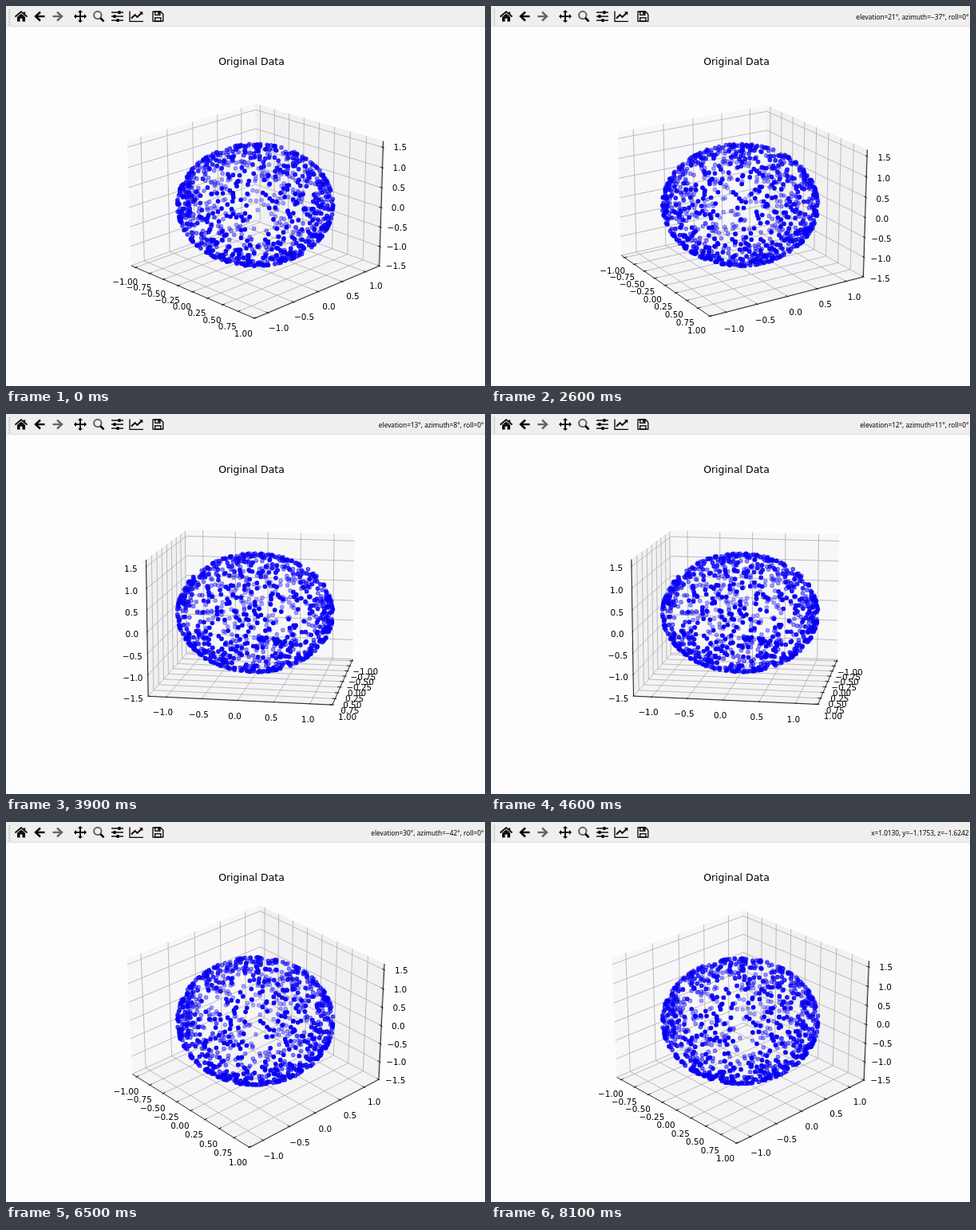
An HTML page with a canvas that plays this animation: 600x477 px, repeating every 8900 ms.

```html
<!DOCTYPE html>
<html lang="en">
<head>
<meta charset="utf-8">
<title>3D scatter</title>
<style>
  html, body { margin: 0; width: 100%; height: 100%; overflow: hidden; background: #fdfcff; }
  canvas { display: block; width: 600px; height: 477px; }
</style>
</head>
<body>
<canvas id="stage" width="600" height="477"></canvas>
<script>
const ctx = document.getElementById('stage').getContext('2d');
const LOOP = 8900, STEP = 100, RAD = Math.PI / 180;
const PLOT_FONT = '"DejaVu Sans", sans-serif';
const UI_FONT = '"Noto Sans", sans-serif';

// key points of the drag: time, elevation, azimuth
const KEYS = [
  [1700, 20.7, -44.8], [2500, 21, -37], [2600, 20.3, -32], [3300, 18, -2],
  [3400, 16.5, 0.3], [4500, 12, 11], [4600, 12.1, 9.5], [5200, 11, -31],
  [5500, 13, -26], [5600, 14.3, -27], [6400, 30, -42.3], [6500, 30.1, -42.6],
  [7100, 26.8, -43.6]
];

function slope(i, c) {
  if (i === 0 || i === KEYS.length - 1) return 0;
  const [a, b, d] = [KEYS[i - 1], KEYS[i], KEYS[i + 1]];
  const h0 = b[0] - a[0], h1 = d[0] - b[0];
  return ((b[c] - a[c]) / h0 * h1 + (d[c] - b[c]) / h1 * h0) / (h0 + h1);
}

// smooth cubic through the key points
function track(t, c) {
  const last = KEYS.length - 1;
  if (t <= KEYS[0][0]) return KEYS[0][c];
  if (t >= KEYS[last][0]) return KEYS[last][c];
  const i = KEYS.findIndex(k => k[0] > t) - 1;
  const a = KEYS[i], b = KEYS[i + 1], h = b[0] - a[0], s = (t - a[0]) / h;
  const ease = s * s * (3 - 2 * s);
  return a[c] + (b[c] - a[c]) * ease
    + h * s * (1 - s) * ((1 - s) * slope(i, c) - s * slope(i + 1, c));
}

// half sizes of the box in view units
const W = 0.595, H = 0.75 * W;
// the data keeps a margin of 10% plus 1/24 inside the box
const FIT = 1 / (1.1 * 25 / 24);

// points spread evenly over an ellipsoid
let seed = 20731;
function random() {
  seed = (seed * 1664525 + 1013904223) >>> 0;
  return seed / 4294967296;
}
const points = Array.from({ length: 1000 }, () => {
  const z = 2 * random() - 1, a = 2 * Math.PI * random(), r = Math.sqrt(1 - z * z);
  return [W * FIT * r * Math.cos(a), W * FIT * r * Math.sin(a), H * FIT * z];
});

const minus = v => String(v).replace('-', '\u2212');
const ticks = (n, step, scale, shift, digits) =>
  Array.from({ length: 2 * n + 1 }, (_, i) => {
    const v = (i - n) * step;
    return { at: shift + scale * v, text: minus(v.toFixed(digits)) };
  });
const XT = ticks(4, 0.25, 0.569, 0.02, 2);
const YT = ticks(2, 0.5, 0.465, -0.012, 1);
const ZT = ticks(3, 0.5, 0.2825, -0.022, 1);

// perspective from a distance of 10
function camera(elev, azim) {
  const se = Math.sin(elev * RAD), ce = Math.cos(elev * RAD);
  const sa = Math.sin(azim * RAD), ca = Math.cos(azim * RAD);
  return ([x, y, z]) => {
    const ahead = ca * x + sa * y, near = ce * ahead + se * z;
    const k = 1877 / (10 - near);
    return [312.2 + k * (ca * y - sa * x), 249 - k * (ce * z - se * ahead), near];
  };
}

function trace(pts) {
  ctx.beginPath();
  pts.forEach(p => ctx.lineTo(p[0], p[1]));
}
function line(pts, width, color = '#000') {
  trace(pts);
  ctx.strokeStyle = color;
  ctx.lineWidth = width;
  ctx.stroke();
}
function fill(pts, color = '#000') {
  trace(pts);
  ctx.fillStyle = color;
  ctx.fill();
}
function box(x, y, w, h, color = '#000') {
  ctx.fillStyle = color;
  ctx.fillRect(x, y, w, h);
}
function label(text, x, y, size, font = PLOT_FONT, align = 'center') {
  ctx.font = size + 'px ' + font;
  ctx.textAlign = align;
  ctx.fillStyle = '#000';
  ctx.fillText(text, x, y + 0.365 * size);
}

function drawPlot(elev, azim) {
  const cam = camera(elev, azim);
  const s = azim < 0 ? -1 : 1;      // side of y facing the viewer
  const n = s * W, f = -n;
  const poly = pts => pts.map(cam);

  fill(poly([[-W, -W, -H], [-W, W, -H], [-W, W, H], [-W, -W, H]]), 'rgba(242,242,242,.5)');
  fill(poly([[-W, f, -H], [W, f, -H], [W, f, H], [-W, f, H]]), 'rgba(230,230,230,.5)');
  fill(poly([[-W, -W, -H], [W, -W, -H], [W, W, -H], [-W, W, -H]]), 'rgba(236,236,236,.5)');

  const grid = pts => line(poly(pts), 0.83, '#b0b0b0');
  XT.forEach(({ at }) => grid([[at, n, -H], [at, f, -H], [at, f, H]]));
  YT.forEach(({ at }) => grid([[W, at, -H], [-W, at, -H], [-W, at, H]]));
  ZT.forEach(({ at }) => grid([[W, f, at], [-W, f, at], [-W, n, at]]));

  const axis = pts => line(poly(pts), 0.83);
  axis([[-W, n, -H], [W, n, -H]]);
  axis([[W, -W, -H], [W, W, -H]]);
  axis([[W, f, -H], [W, f, H]]);

  const out = W + 0.0095, inn = W - 0.019;
  const side = W + 0.095, below = -H - 0.075, beside = W + 0.079;
  const tag = (text, p) => {
    const [x, y] = cam(p);
    label(text, x, y, 10.4);
  };
  XT.forEach(({ at, text }) => {
    axis([[at, s * inn, -H], [at, s * out, -H]]);
    tag(text, [at, s * side, below]);
  });
  YT.forEach(({ at, text }) => {
    axis([[inn, at, -H], [out, at, -H]]);
    tag(text, [side, at, below]);
  });
  ZT.forEach(({ at, text }) => {
    axis([[inn, f, at], [out, f, at]]);
    tag(text, [beside, -s * beside, at]);
  });

  // far dots are paler
  const dots = points.map(cam).sort((a, b) => a[2] - b[2]);
  const far = dots[0][2], span = dots[dots.length - 1][2] - far;
  ctx.lineWidth = 1.04;
  for (const [x, y, d] of dots) {
    ctx.beginPath();
    ctx.arc(x, y, 2.33, 0, 2 * Math.PI);
    ctx.fillStyle = ctx.strokeStyle = `rgba(8,0,245,${0.3 + 0.7 * (d - far) / span})`;
    ctx.fill();
    ctx.stroke();
  }
  label('Original Data', 307.5, 69, 12.5);
}

function arrow(x, dir, color) {
  const tip = x - 5 * dir;
  line([[x + 6.5 * dir, 13], [tip, 13]], 2.4, color);
  line([[x + dir, 7.5], [tip, 13], [x + dir, 18.5]], 2.4, color);
}

function drawToolbar() {
  box(0, 0, 600, 25, '#f0eff0');
  box(0, 25, 600, 1, '#dcdbdd');
  for (let y = 4; y < 23; y += 3) box(3.5, y, 1.5, 1.5, '#b4b4b4');

  // home
  line([[11.5, 13.5], [19, 7.2], [26.5, 13.5]], 1.7);
  fill([[14, 13.7], [19, 9.6], [24, 13.7]]);
  box(14, 13.5, 3.5, 6);
  box(20.5, 13.5, 3.5, 6);
  box(17, 13.5, 4, 2);
  box(22.2, 7.5, 2, 4);

  arrow(42, 1, '#000');
  arrow(65, -1, '#666');

  // pan
  for (let i = 0; i < 4; i++) {
    ctx.save();
    ctx.translate(93, 13);
    ctx.rotate(i * Math.PI / 2);
    box(-0.9, -6, 1.8, 6);
    fill([[0, -8], [3, -5], [-3, -5]]);
    ctx.restore();
  }

  // zoom
  ctx.beginPath();
  ctx.arc(114.8, 11.5, 4.7, 0, 2 * Math.PI);
  ctx.lineWidth = 2.1;
  ctx.stroke();
  line([[118.2, 15], [122.6, 19.4]], 2.6);

  // sliders
  [142, 136, 140].forEach((x, i) => {
    const y = 8 + 5 * i;
    box(132, y - 0.7, 15, 1.4);
    box(x - 1.5, y - 2, 3, 4);
  });

  // chart
  line([[155, 6.5], [155, 19.3], [172, 19.3]], 1.3);
  line([[157, 15.5], [161.5, 11], [164.5, 14], [169.5, 9]], 1.9);
  fill([[167, 7.3], [171.3, 7.3], [171.3, 11.6]]);

  // save
  line([[184, 7], [193.5, 7], [196.8, 10.3], [196.8, 19.2], [184, 19.2], [184, 6.4]], 1.3);
  ctx.strokeRect(186.7, 7, 6.3, 4.2);
  ctx.strokeRect(186.7, 14.8, 7.3, 4.4);
  box(190.3, 7, 2.2, 3.6);
}

function status(t) {
  if (t < 1800) return '';
  if (t < 7200) {
    // the readout trails the view by one step
    const [elev, azim] = [1, 2].map(c => minus(Math.round(track(t - STEP, c))));
    return `elevation=${elev}°, azimuth=${azim}°, roll=0°`;
  }
  const y = -1.1753 + 0.0184 * Math.max(0, 8100 - t) / STEP;
  return `x=1.0130, y=${minus(y.toFixed(4))}, z=${minus(-1.6242)}`;
}

function draw(time) {
  const t = Math.floor((time % LOOP) / STEP) * STEP;
  box(0, 0, 600, 477, '#fdfcff');
  drawPlot(track(t, 1), track(t, 2));
  drawToolbar();
  label(status(t), 598.5, 13.5, 8.25, UI_FONT, 'right');
}

const start = performance.now();
function frame() {
  draw(performance.now() - start);
  requestAnimationFrame(frame);
}
frame();
</script>
</body>
</html>
```
